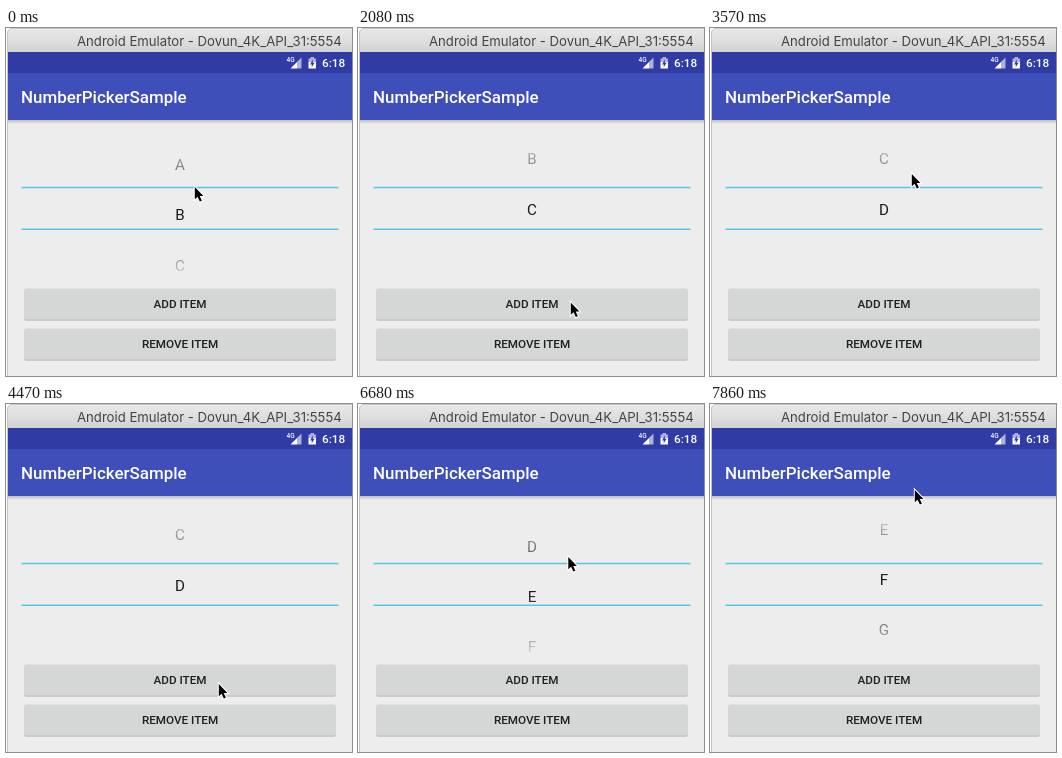
These frames come from a looping animation (346 px wide and 348 px high, 8000 ms). An HTML page:

```html
<!DOCTYPE html>
<html lang="en">
<head>
<meta charset="utf-8">
<title>NumberPickerSample</title>
<style>
  html, body { margin: 0; width: 100%; height: 100%; overflow: hidden; background: #fff; }
  svg { display: block; width: 346px; height: 348px; font-family: Roboto, sans-serif; }
  .medium { font-weight: 500; }
  .mid { text-anchor: middle; }
  .button rect { fill: #d5d7d6; }
  .button .shadow { fill: #c0c2c1; }
  .button text { font-size: 11.7px; fill: #1f1f1f; }
  #add.pressed .face { fill: #cccecd; }
</style>
</head>
<body>
<svg viewBox="0 0 346 348">
  <defs>
    <linearGradient id="bar" x2="0" y2="1">
      <stop stop-color="#e9e9e9"/><stop offset="1" stop-color="#d3d3d3"/>
    </linearGradient>
    <linearGradient id="drop" x2="0" y2="1">
      <stop stop-opacity=".2"/><stop offset="1" stop-opacity="0"/>
    </linearGradient>
    <linearGradient id="edges" x2="0" y2="1">
      <stop stop-color="#fff" stop-opacity="0"/><stop offset=".45" stop-color="#fff"/>
      <stop offset=".55" stop-color="#fff"/><stop offset="1" stop-color="#fff" stop-opacity="0"/>
    </linearGradient>
    <mask id="fade" maskUnits="userSpaceOnUse" x="0" y="105" width="346" height="152">
      <rect y="105" width="346" height="152" fill="url(#edges)"/>
    </mask>
  </defs>

  <!-- window -->
  <path d="M1 348V6Q1 1 6 1H346V348Z" fill="#ededed"/>
  <path d="M1 24V6Q1 1 6 1H346V24Z" fill="url(#bar)"/>
  <text x="71" y="18" font-size="13.15" fill="#444" style="font-family:Inter,sans-serif">Android Emulator - Dovun_4K_API_31:5554</text>

  <!-- status bar and toolbar -->
  <rect x="1" y="24" width="345" height="21.5" fill="#303ca3"/>
  <rect x="1" y="45" width="345" height="47" fill="#3f4fb9"/>
  <rect x="1" y="92" width="345" height="4" fill="url(#drop)"/>
  <path d="M1.5 348V6Q1.5 .5 6 .5H346" fill="none" stroke="#c4c4c4"/>
  <g fill="#fff" class="medium">
    <text x="15" y="75" font-size="16.95">NumberPickerSample</text>
    <text x="316" y="39" font-size="11.8">6:18</text>
    <text x="280.5" y="34" font-size="6.5">4G</text>
    <path d="M284.5 40.5L291.5 33.5V40.5Z"/>
    <path d="M291.5 33.5L295.5 29.5V40.5H291.5Z" opacity=".6"/>
    <path d="M302.5 30.5H304.5V29H308V30.5H310V34H302.5Z" opacity=".6"/>
    <path d="M302.5 34H310V40.5H302.5Z"/>
    <path d="M307 31.5L304 36.5H306L305.5 39.5L308.7 34.7H306.8Z" fill="#303ca3"/>
  </g>

  <!-- picker -->
  <g mask="url(#fade)"><g id="items" class="mid" font-size="15.2" fill="#191919"></g></g>
  <path d="M15.5 159.5H332.5M15.5 201.2H332.5" stroke="#55c5e2" stroke-width="1.6"/>

  <g id="add" class="button medium mid">
    <rect class="shadow" x="18" y="261.5" width="312" height="31.2" rx="2"/>
    <rect class="face" x="18" y="260.5" width="312" height="31" rx="2"/>
    <text x="174" y="280.2">ADD ITEM</text>
  </g>
  <g class="button medium mid">
    <rect class="shadow" x="18" y="301.5" width="312" height="31.2" rx="2"/>
    <rect class="face" x="18" y="300.5" width="312" height="31" rx="2"/>
    <text x="174" y="320.4">REMOVE ITEM</text>
  </g>

  <path id="cursor" d="M1.8 2V14.3L4.6 11.7L6.8 16.6L8.9 15.7L6.7 10.9H10.4Z"
        fill="#000" stroke="#fff" stroke-width="2" paint-order="stroke"/>
</svg>
<script>
const LOOP = 8000, STEP = 145, ROW = 50.3;
const REST = { x: 187, y: 157, scroll: 44.5 };
// [start, steps, cursor x, cursor y, list scroll in px]
const MOVES = [
  [450, 3, 191, 163.5, ROW],
  [890, 2, 190, 144, 2 * ROW],
  [1490, 4, 219, 266, 2 * ROW],
  [2080, 1, 211, 272.5, 2 * ROW],
  [2370, 4, 200, 195, 2 * ROW],
  [3120, 4, 200, 144, 3 * ROW],
  [3870, 5, 211, 278, 3 * ROW],
  [6080, 1, 211, 217.5, 3 * ROW],
  [6230, 2, 212, 190, 3 * ROW],
  [6530, 4, 205, 112, 228.9],
  [7130, 1, 204, 110, 230.9],
  [7280, 2, 204, 97, 243.9],
  [7710, 2, 203, 84, 256.9],
];

const $ = id => document.getElementById(id);
const letters = [..."ABCDEFG"].map((letter, i) => {
  const el = document.createElementNS("http://www.w3.org/2000/svg", "text");
  el.textContent = letter;
  el.setAttribute("x", 174);
  el.setAttribute("y", 186.6 + i * ROW);
  return $("items").appendChild(el);
});

function poseAt(t) {
  let pose = REST;
  for (const [start, steps, x, y, scroll] of MOVES) {
    if (t < start) break;
    const k = Math.min(1, (Math.floor((t - start) / STEP) + 1) / steps);
    const mix = (a, b) => a + (b - a) * k;
    pose = { x: mix(pose.x, x), y: mix(pose.y, y), scroll: mix(pose.scroll, scroll) };
  }
  return pose;
}

function draw(t) {
  const { x, y, scroll } = poseAt(t);
  const count = t < 2370 ? 3 : t < 4760 ? 4 : t < 6080 ? 5 : 7;
  $("cursor").setAttribute("transform", `translate(${x} ${y})`);
  $("items").setAttribute("transform", `translate(0 ${-scroll})`);
  letters.forEach((el, i) => el.setAttribute("visibility", i < count ? "visible" : "hidden"));
  $("add").classList.toggle("pressed", t >= 4760 && t < 6230);
}

const begin = performance.now();
function tick() {
  draw((performance.now() - begin) % LOOP);
  requestAnimationFrame(tick);
}
tick();
</script>
</body>
</html>
```
